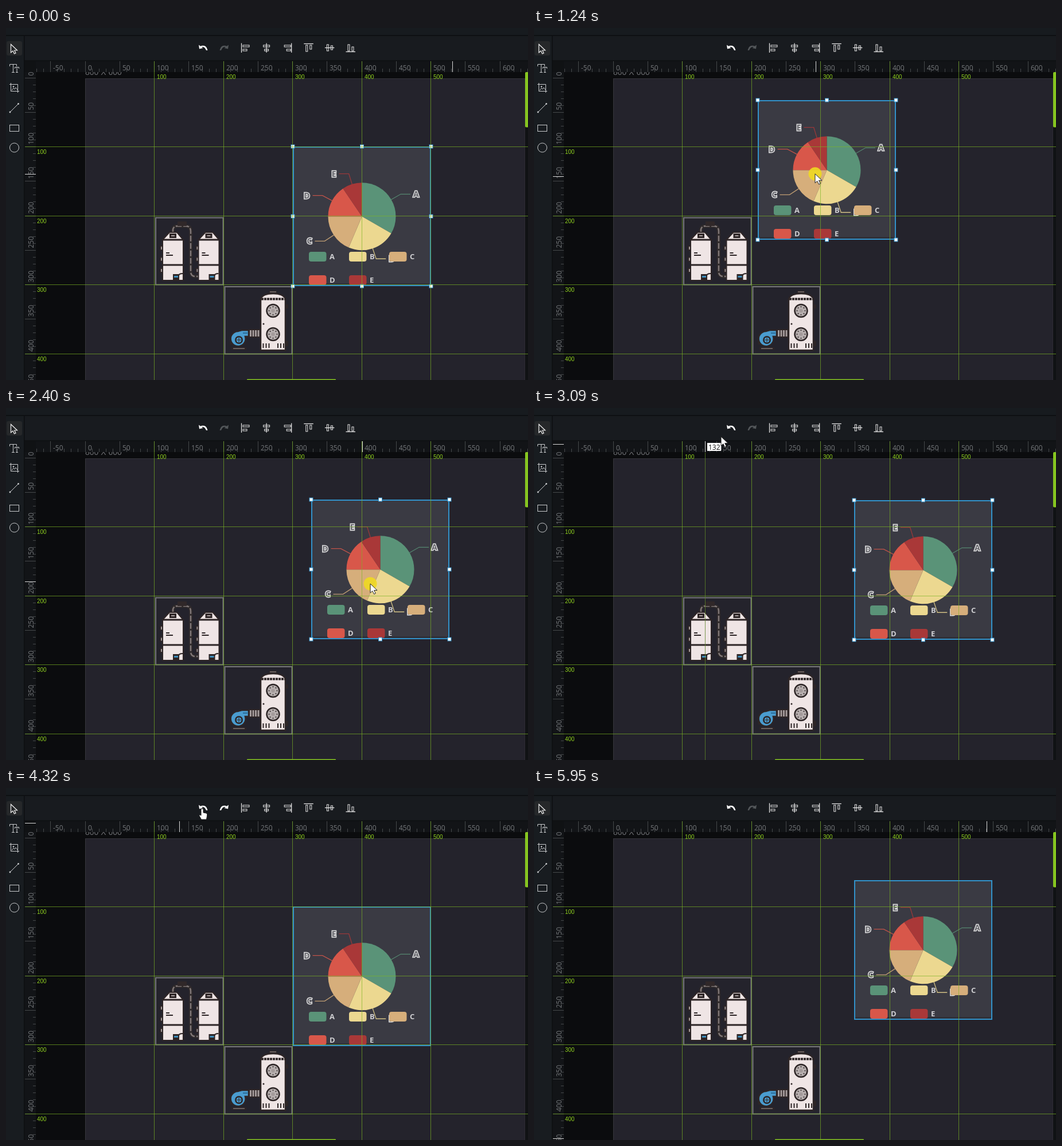
An HTML page for the animation above (6.75 s loop, 910 by 615 pixels).

```html
<!DOCTYPE html>
<html lang="en">
<head>
<meta charset="utf-8">
<title>Snap and undo in a canvas editor</title>
<style>
  html, body { margin: 0; width: 100%; height: 100%; overflow: hidden; background: #0b0c0e; }
  svg { display: block; width: 910px; height: 615px; }
  .ruler { font: 12px "Open Sans", Arial, sans-serif; fill: #74777a; }
  .guide { font: 10px Arial, "Liberation Sans", sans-serif; fill: #8fd01f; }
  .size { font: 14px Arial, "Liberation Sans", sans-serif; fill: #6c6e72; }
  .label { font: bold 14px "Open Sans", Arial, sans-serif; fill: #66666c; stroke: #dededf; stroke-width: 3px; paint-order: stroke; }
  .legend { font: bold 13px "Open Sans", Arial, sans-serif; fill: #cfcfd2; }
  .tip { font: 12px "Open Sans", Arial, sans-serif; fill: #111; }
</style>
</head>
<body>
<svg id="stage" viewBox="0 0 910 615"></svg>
<script>
const LOOP = 6750;
const BLUE = '#3292ca', LIME = '#86c520', DARK = '#2d2526', PALE = '#efe5e5', ASH = '#a39a9a', ICON = '#c9cbcd';
const svg = document.getElementById('stage');

// Document units to stage pixels.
const SCALE = 1.205;
const toX = v => 138.5 + v * SCALE;
const toY = v => 87.5 + v * SCALE;
const crisp = v => Math.round(v) - .5;

const range = (n, f) => Array.from({ length: n }, (_, i) => f(i)).join('');
const rect = (x, y, w, h, fill, more = '') =>
  `<rect x="${x}" y="${y}" width="${w}" height="${h}" fill="${fill}" ${more}/>`;
const frame = (x, y, w, h, color, width = 1) =>
  rect(x, y, w, h, 'none', `stroke="${color}" stroke-width="${width}"`);
const path = (d, stroke, width = 1, more = '') =>
  `<path d="${d}" fill="none" stroke="${stroke}" stroke-width="${width}" ${more}/>`;
const shape = (d, fill, stroke = 'none', width = 1) =>
  `<path d="${d}" fill="${fill}" stroke="${stroke}" stroke-width="${width}"/>`;
const disc = (x, y, r, fill, more = '') =>
  `<circle cx="${x}" cy="${y}" r="${r}" fill="${fill}" ${more}/>`;
const text = (x, y, s, cls, more = '') =>
  `<text x="${x}" y="${y}" class="${cls}" ${more}>${s}</text>`;
const group = (body, more = '') => `<g ${more}>${body}</g>`;

function rulers() {
  let ticks = '', across = '', down = '';
  for (let v = -70; v <= 640; v += 10) {
    const x = crisp(toX(v)), y = crisp(toY(v)), major = v % 50 === 0;
    if (x > 53) ticks += `M${x} ${major ? 58 : 71}V77`;
    if (y > 77) ticks += `M${major ? 33 : 47} ${y}H52`;
    if (!major) continue;
    if (x > 53) across += text(x + 4.5, 73.5, v, 'ruler');
    if (v >= 0) down += text(0, 0, v, 'ruler', `transform="translate(48 ${y - 4}) rotate(-90)"`);
  }
  return rect(32, 58, 878, 19, '#121417') + rect(32, 58, 20, 557, '#121417') +
    path(ticks, '#45484a') + across +
    '<clipPath id="side"><rect x="32" y="77" width="20" height="538"/></clipPath>' +
    group(down, 'clip-path="url(#side)"') + rect(32, 58, 20, 19, '#101214');
}

function guides() {
  let d = '', labels = '';
  for (let v = 100; v <= 500; v += 100) {
    const x = crisp(toX(v)), y = crisp(toY(v));
    d += `M${x} 58V615`;
    labels += text(x + 4.5, 89, v, 'guide');
    if (v === 500) continue;
    d += `M33 ${y}H910`;
    labels += text(54, y + 12.5, v, 'guide');
  }
  return path(d, '#7bb524', 1, 'opacity=".66"') + labels;
}

function silo(dx) {
  return group(
    range(3, i => rect(268, 380 + 19.5 * i, 8, 9, DARK) + rect(270, 382 + 19.5 * i, 2, 5, ASH)) +
    shape('M273 370L285 357H298L309 370Z', PALE, DARK, 2) +
    rect(285, 359, 12, 8, DARK) + rect(288, 362, 6, 2, ASH) +
    shape('M273 370H309V441H273Z', PALE, DARK, 2) +
    path('M273 370H309M273 414H309', DARK, 3) + path('M279 393H285M279 397H291', DARK, 2) +
    rect(291, 430, 11, 10, DARK) + rect(293, 433, 7, 3, '#3f8fbe') +
    path('M301 433Q301 429 308 429', DARK, 2), `transform="translate(${dx} 0)"`);
}

function silos() {
  const pipe = 'M291 357V352Q292 346 299 346H313Q322 346 322 355V425Q322 434 330 434H337';
  return frame(261, 331.5, 117.5, 117, '#77777b', 2) +
    path(pipe, '#2f2a2b', 6) + path(pipe, '#827979', 2.4, 'stroke-dasharray="10 3"') +
    rect(299, 338, 16, 8, '#302829') + silo(0) + silo(62.5);
}

function porthole(y) {
  const bolt = i => disc(465.5 + 7 * Math.cos(i * Math.PI / 4), y + 7 * Math.sin(i * Math.PI / 4), 1, DARK);
  return disc(465.5, y, 11, '#b6aeae', `stroke="${DARK}" stroke-width="2.5"`) + range(8, bolt) +
    disc(465.5, y, 3, ASH);
}

function blower() {
  return frame(381.5, 452, 117, 117.5, '#77777b', 2) +
    rect(459, 459, 13, 4, DARK) + path('M460 461H471', ASH) +
    shape('M444 563V473Q448 464 465.5 464T487 473V563Z', PALE, DARK, 2.5) +
    path('M445 473.5H487', DARK, 4, 'stroke-dasharray="4 1"') + porthole(494) + porthole(535) +
    range(3, i => path(`M${448.5 + 5 * i} 551V559M${484 - 5 * i} 551V559`, DARK, 2)) +
    disc(449, 517, 1.5, DARK) + rect(488, 483, 4, 7, DARK) + rect(488, 547, 4, 9, DARK) +
    rect(424, 526, 19, 15, DARK) + range(4, i => rect(425 + 4.5 * i, 528, 3, 11, ASH)) +
    rect(393, 558, 26, 4, DARK) + path('M396 560H416', ASH) + path('M393 538V553', DARK, 5) +
    shape('M423 528V539H417A13 13 0 1 1 404 530L411 528Z', '#4a9ccf', DARK, 2.5) +
    path('M413 533H421', '#2b6d99', 2) +
    disc(406, 545, 7, DARK) + disc(406, 545, 4.5, '#4a9ccf') + path('M402 545H410M406 541V549', DARK);
}

function chart() {
  const slices = [[120, '#5a9378'], [83, '#ecd890'], [67, '#d6ae7b'], [56, '#d8574a'], [34, '#a93838']];
  const polar = (deg, r) => {
    const a = deg * Math.PI / 180;
    return [120.5 + r * Math.sin(a), 122.3 - r * Math.cos(a)];
  };
  let turn = 0, pie = '', leaders = '', legend = '';
  slices.forEach(([deg, fill], i) => {
    const name = 'ABCDE'[i], mid = turn + deg / 2, side = mid < 180 ? 1 : -1;
    const [ex, ey] = polar(mid, 78), end = ex + side * 17;
    pie += shape(`M${polar(0, 0)}L${polar(turn, 59)}A59 59 0 0 1 ${polar(turn + deg, 59)}Z`, fill);
    leaders += path(`M${polar(mid, 59)}L${ex} ${ey}H${end}`, fill, 1.3, 'opacity=".85"') +
      text(end + side * 5, ey + 5, name, 'label', `text-anchor="${side > 0 ? 'start' : 'end'}"`);
    const x = 28 + 70 * (i % 3), y = 184 + 41 * Math.floor(i / 3);
    legend += rect(x, y, 30.5, 17, fill, 'rx="4"') + text(x + 36, y + 12.5, name, 'legend');
    turn += deg;
  });
  return rect(1, 1, 239, 242, '#3a3a43') + rect(1, 239, 239, 4, '#303038') + pie + leaders + legend +
    frame(1, 1, 239, 242, BLUE, 2);
}

const handles = () => range(9, i => i === 4 ? '' :
  rect(i % 3 * 120.5 - 3, Math.floor(i / 3) * 122 - 3, 6, 6, '#fff', `stroke="${BLUE}"`));

// Two bars against an axis; at is 0, .5 or 1 for start, middle or end.
function alignIcon(i) {
  const at = i % 3 / 2, upright = i > 2;
  const bar = (y, len) => frame(Math.round((at - .5) * (12 - len)) - len / 2 + (1 - 2 * at), y, len, 3, '#e8e8e8');
  const axis = (at - .5) * 14;
  return group(path(`M${axis} -8V8.5`, '#eee', 1.2) + bar(-4.5, 11) + bar(2.5, 7),
    `transform="translate(${417.5 + 36.6 * i} 34.5) ${upright ? 'matrix(0 1 1 0 0 0)' : ''}"`);
}

const CURL = 'M336 29.5L337 36.5L343.5 35L341 33.3Q346 31.5 349 39L351.5 39Q349 28 339 31.7Z';

function tools() {
  return rect(0, 0, 910, 13, '#171b1f') + rect(0, 12.5, 910, 1.2, '#0c0e10') + rect(0, 14, 910, 43, '#181b1f') +
    rect(0, 14, 31, 601, '#181c20') + rect(31, 14, 1.5, 601, '#0d0f11') + rect(32, 56.5, 878, 1.5, '#0d0f11') +
    rect(1, 23, 27, 25, '#26282a', 'rx="3"') +
    path('M8.5 28.5V43L12 40L14.5 45L17 44L14.8 39H19.5Z', '#f0f0f0', 1.2) +
    path('M6.5 67V63.5H18.5V67M12.5 63.5V77.5M10 77.5H15M15.5 71V68.5H22.5V71M19 68.5V77.5M17 77.5H21', ICON) +
    path('M8.5 96V110.5H23M6 98.5H20.5V113M10 109L13 105L15 107L17 104L20 108', ICON) + disc(13, 102.5, 1.3, ICON) +
    path('M7 147L21.5 132.5', ICON) + disc(7, 147, 1.4, ICON) + disc(21.5, 132.5, 1.4, ICON) +
    frame(6.5, 169.5, 16, 11, ICON) + disc(14.5, 209, 8, 'none', `stroke="${ICON}"`) +
    shape(CURL, '#fff') + `<path id="redo" d="${CURL}" transform="translate(724 0) scale(-1 1)"/>` +
    range(6, alignIcon);
}

svg.innerHTML =
  rect(0, 0, 910, 615, '#0b0c0e') +
  rect(138.5, 88.5, 766.5, 530, '#24232c', 'stroke="#36363c"') +
  text(138, 81.5, '800 X 600', 'size') +
  silos() + blower() +
  group(chart() + group(handles(), 'id="grips"'), 'id="chart"') +
  rulers() + rect(905, 77, 5, 538, '#101214') +
  rect(905, 77, 6, 96.5, LIME, 'rx="2"') + rect(420, 613.5, 155, 3, LIME, 'rx="1"') +
  guides() + tools() +
  '<path id="mark" stroke="#d8d8d8" fill="none"/>' +
  group(path('M0 78V615', '#5e852a', 1, 'opacity=".8"') + rect(3.5, 61, 24, 14, '#fff') +
    '<text id="value" x="5.5" y="73" class="tip"></text>', 'id="hint"') +
  group(disc(0, 0, 11.5, '#f0d921', 'id="press"') +
    group(shape('M0 0V16L3.8 12.7L6.6 18.3L9.2 17L6.6 11.5H12Z', '#fff', '#222'), 'id="arrow"') +
    group(shape('M-2 0Q0 -2 2 0V6L7 7Q9 7.5 8.8 10L7.5 18H-1.5L-5 11.5Q-5.5 9 -2 11Z', '#fff', '#222'), 'id="hand"'),
    'id="cursor"');

// Each leg ends at [time, x, y] and is followed by a rest.
const legs = [
  [0, 778, 255], [400, 600, 335, 80], [890, 500, 283], [1450, 484, 238, 140], [1930, 524, 283],
  [2400, 635, 307], [2750, 661, 308, 110], [3030, 298, 64], [3090, 326, 50], [3300, 342, 37, 1100],
  [4800, 380, 37, 680], [5900, 789, 612]];

function cursorAt(t) {
  const i = legs.findIndex(leg => leg[0] > t);
  if (i < 1) return legs[i < 0 ? legs.length - 1 : 0].slice(1, 3);
  const [t0, x0, y0, rest = 0] = legs[i - 1], [t1, x1, y1] = legs[i];
  const p = Math.max(0, (t - t0 - rest) / (t1 - t0 - rest));
  return [x0 + (x1 - x0) * p, y0 + (y1 - y0) * p];
}

// The ruler mark trails the cursor and freezes while it is in the toolbar.
const markAt = t => cursorAt(t < 5480 ? Math.min(t - 60, 3040) : t - 20);

const home = [toX(300), toY(100) - 1.5], snapped = [toX(200), toY(0) - 1.5];

// A dragged box sticks to the nearest crossing of guides.
function drag(t, grip) {
  const free = cursorAt(t).map((v, i) => v - grip[i]);
  const step = 100 * SCALE;
  const stuck = free.map((v, i) => home[i] + Math.round((v - home[i]) / step) * step);
  return Math.hypot(free[0] - stuck[0], free[1] - stuck[1]) < 32 ? stuck : free;
}

function chartAt(t) {
  const moved = () => drag(Math.min(t, 2750), [103, 147]);
  if (t < 1590) return drag(Math.max(t, 400), [100, 129]);
  if (t < 1940) return snapped;
  if (t < 3570) return moved();
  if (t < 4250) return snapped;
  if (t < 4930) return home;
  return t < 5460 ? snapped : moved();
}

const el = id => document.getElementById(id);
const show = (id, on) => el(id).setAttribute('visibility', on ? 'inherit' : 'hidden');
const move = (id, x, y) => el(id).setAttribute('transform', `translate(${x} ${y})`);
const within = (t, from, to) => t >= from && t < to;

function draw(t) {
  move('chart', ...chartAt(t).map(Math.round));
  show('grips', t < 3570);

  const [mx, my] = markAt(t).map(v => Math.floor(v) + .5);
  el('mark').setAttribute('d', `M${mx} 58V77M33 ${my}H52`);
  move('hint', mx, 0);
  el('value').textContent = Math.floor((mx - toX(0)) / SCALE);
  show('hint', within(t, 3060, 3160));
  el('redo').setAttribute('fill', within(t, 3710, 5460) ? '#fff' : '#53575a');

  const hand = within(t, 3200, 5500);
  move('cursor', ...cursorAt(t));
  show('cursor', within(t, 70, 5900));
  show('hand', hand);
  show('arrow', !hand);
  show('press', within(t, 420, 1500) || within(t, 1900, 2800));
  el('press').setAttribute('opacity', within(t, 1900, 1990) ? .68 : .9);
}

const start = performance.now();
function tick() {
  draw((performance.now() - start) % LOOP);
  requestAnimationFrame(tick);
}
draw(0);
requestAnimationFrame(tick);
</script>
</body>
</html>
```
